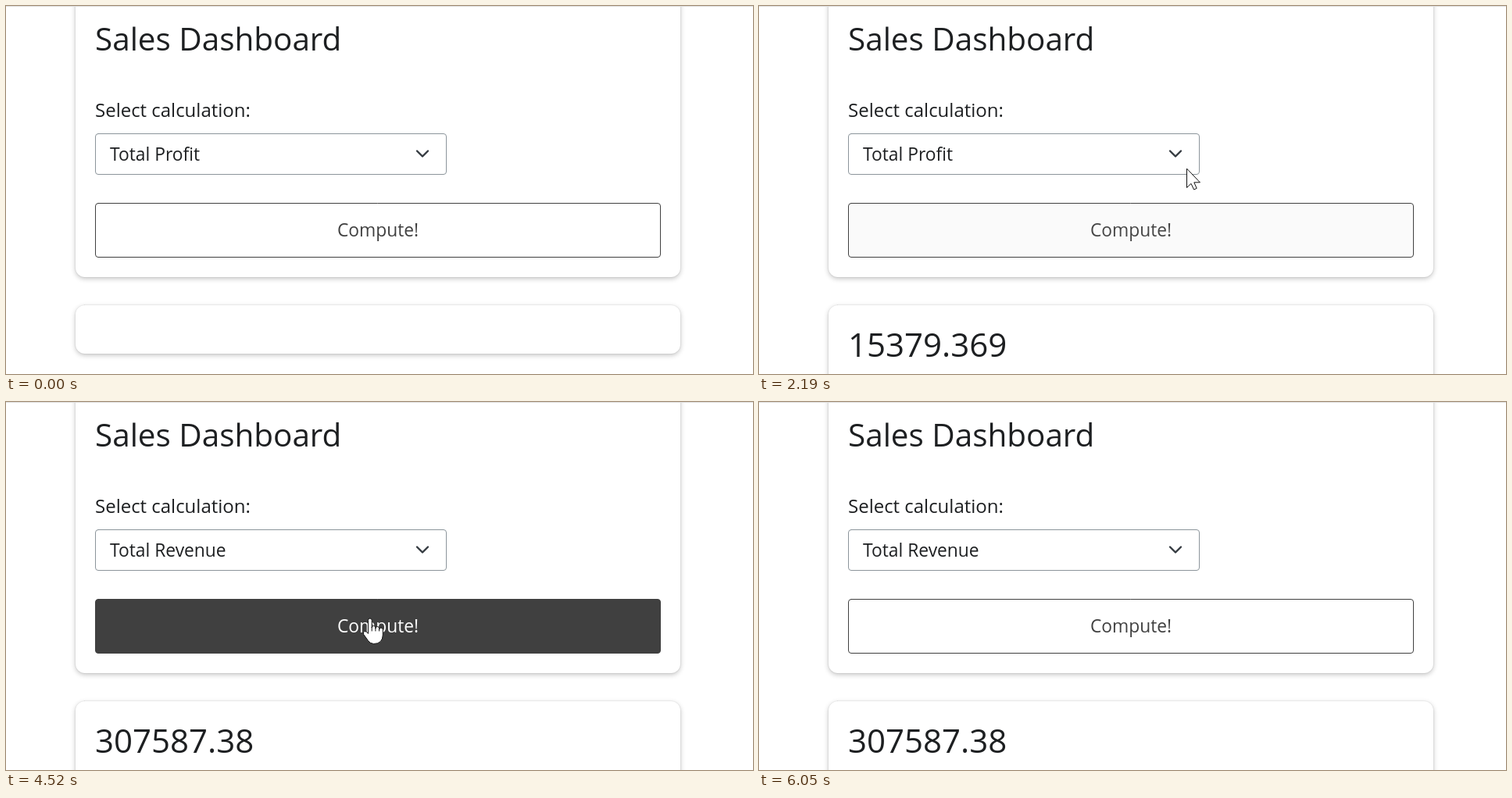
These frames come from a looping animation (956x471 px, 6550 ms). An HTML page with a canvas:

```html
<!DOCTYPE html>
<html lang="en">
<head>
<meta charset="utf-8">
<title>Sales Dashboard</title>
<style>
html, body { margin: 0; width: 100%; height: 100%; overflow: hidden; background: #fff; }
canvas { display: block; }
</style>
</head>
<body>
<canvas id="stage" width="956" height="471"></canvas>
<script>
const ctx = document.getElementById('stage').getContext('2d');
const LOOP = 6550;
const STEP = 67;
const START = 230;
const INK = '#1d1f21';

// Pointer moves: start time, end time, destination.
const origin = { x: 470, y: 332 };
const moves = [
  { from: 230, to: 430, x: 488, y: 309 },
  { from: 630, to: 836, x: 494, y: 237 },
  { from: 836, to: 967, x: 494, y: 268 },
  { from: 1040, to: 1390, x: 510, y: 283 },
  { from: 1970, to: 2173, x: 547, y: 208 },
  { from: 2240, to: 2520, x: 537, y: 185 },
  { from: 2650, to: 3100, x: 441, y: 279 },
  { from: 3600, to: 3710, x: 467, y: 279 },
  { from: 4520, to: 4720, x: 535, y: 174 },
  { from: 4720, to: 4920, x: 614, y: 289 },
  { from: 5060, to: 5390, x: 535, y: 201 },
  { from: 5600, to: 5720, x: 873, y: 468 }
];

const shown = [START, 6050];
const open = [2590, 3380];
const focus = [2600, 3960];
const hovers = [[315, 740], [970, 2055], [3380, 4560], [4895, 5190]];
const clicks = [[1600, 1700], [2520, 2640], [3240, 3380], [3850, 4000]];

const within = (t, [a, b]) => t >= a && t < b;
const clamp = x => Math.min(1, Math.max(0, x));
const smooth = x => x * x * (3 - 2 * x);

// The screen refreshes in even steps.
const stepTime = t => START + Math.floor((t - START + 10) / STEP) * STEP;

function pointerAt(t) {
  let { x, y } = origin;
  for (const move of moves) {
    const k = smooth(clamp((t - move.from) / (move.to - move.from)));
    x += (move.x - x) * k;
    y += (move.y - y) * k;
  }
  return { x: Math.round(x), y: Math.round(y) };
}

// The CSS "ease" timing curve.
function ease(x) {
  let lo = 0, hi = 1;
  for (let i = 0; i < 20; i++) {
    const s = (lo + hi) / 2;
    if (0.75 * s * (1 - s) + s ** 3 < x) lo = s; else hi = s;
  }
  return 0.3 * lo * (1 - lo) ** 2 + 3 * lo * lo * (1 - lo) + lo ** 3;
}

const ramp = t => t <= 0 ? 0 : t >= 150 ? 1 : ease(t / 150);
const fade = (t, [on, off]) => ramp(t - on) - ramp(t - off);

function gray(from, to, k) {
  const v = Math.round(from + (to - from) * k);
  return `rgb(${v},${v},${v})`;
}

function box(x, y, w, h, r, fill, stroke) {
  ctx.beginPath();
  ctx.roundRect(x, y, w, h, r);
  if (fill) { ctx.fillStyle = fill; ctx.fill(); }
  if (stroke) { ctx.strokeStyle = stroke; ctx.lineWidth = 1; ctx.stroke(); }
}

function shadowed(color, blur, dy, draw) {
  ctx.save();
  ctx.shadowColor = color;
  ctx.shadowBlur = blur;
  ctx.shadowOffsetY = dy;
  draw();
  ctx.restore();
}

function text(str, x, y, size, color = INK, align = 'left') {
  ctx.font = `400 ${size}px "Open Sans", sans-serif`;
  ctx.textAlign = align;
  ctx.fillStyle = color;
  ctx.fillText(str, x, y);
}

function card(y, h) {
  shadowed('rgba(0,0,0,.24)', 6, 2, () => box(89, y, 774, h, 12, '#fff'));
  box(88.5, y - 0.5, 775, h + 1, 12, null, 'rgba(0,0,0,.04)');
}

function select(value, ring) {
  if (ring > 0) {
    const grow = 6 * ring;
    box(114 - grow, 163 - grow, 450 + 2 * grow, 53 + 2 * grow, 4 + grow,
      `rgba(0,123,194,${0.25 * ring})`);
  }
  box(114.5, 163.5, 449, 52, 3.5, '#fff', ring > 0.5 ? '#80bde1' : '#8c959b');
  text(value, 133, 198, 22.8);
  ctx.strokeStyle = '#343a40';
  ctx.lineWidth = 2.4;
  ctx.lineCap = ctx.lineJoin = 'round';
  ctx.stroke(new Path2D('M526 185.5L533 192.5L540 185.5'));
}

function button(k) {
  box(114.5, 252.5, 723, 69, 3.5, gray(255, 64, k), '#404040');
  text('Compute!', 476, 295, 22.8, gray(64, 255, k), 'center');
}

function dropdown(active) {
  shadowed('rgba(0,0,0,.4)', 12, 0, () => box(116, 215, 447, 89, 0, '#fff'));
  ctx.fillStyle = '#767676';
  ctx.fillRect(116, 215, 447, 1);
  ctx.fillRect(116, 215, 1, 89);
  ['Total Profit', 'Total Revenue'].forEach((label, i) => {
    const y = 216 + 44 * i;
    if (i === active) box(117, y, 446, 44, 0, '#1967d2');
    text(label, 135, y + 31, 23.2, i === active ? '#fff' : INK);
  });
}

const arrow = new Path2D('M.5 .5V24.5L6 19.3L9.6 27L13.2 25.4L9.8 17.8H17Z');
const hand = new Path2D('M-3.5 17');
const knuckles = new Path2D();
[-2, 7.5, 8.5, 10].forEach((top, i) => {
  const w = 4.7, x = -3.5 + w * i;
  hand.lineTo(x, top + w / 2);
  hand.arc(x + w / 2, top + w / 2, w / 2, Math.PI, 0);
  if (i) {
    knuckles.moveTo(x, top + 2);
    knuckles.lineTo(x, 14);
  }
});
hand.addPath(new Path2D());
hand.lineTo(15.3, 19);
hand.quadraticCurveTo(15, 30.5, 3.5, 30.5);
hand.quadraticCurveTo(-1.5, 30, -3.5, 26.5);
hand.lineTo(-9.3, 18.5);
hand.quadraticCurveTo(-10.5, 15.5, -8.5, 14.6);
hand.quadraticCurveTo(-6, 14, -3.5, 17);

function pointer(x, y, isHand) {
  const shape = isHand ? hand : arrow;
  ctx.save();
  ctx.translate(x, y);
  ctx.fillStyle = '#fff';
  ctx.strokeStyle = '#111';
  ctx.lineWidth = 1;
  ctx.lineJoin = 'round';
  ctx.fill(shape);
  ctx.stroke(shape);
  if (isHand) ctx.stroke(knuckles);
  ctx.restore();
}

function render(time) {
  const t = stepTime(time);
  const { x, y } = pointerAt(t);
  const isOpen = within(time, open);
  const result = time < 1655 ? '' : time < 4055 ? '15379.369' : '307587.38';
  const hover = hovers.reduce((sum, range) => sum + fade(t, range), 0);

  box(0, 0, 956, 471, 0, '#fff');
  card(-30, 377);
  card(383, result ? 116 : 62);
  box(0, 0, 956, 1, 0, '#e0e0e0');

  text('Sales Dashboard', 114, 57, 40.4);
  text('Select calculation:', 114, 142, 24);
  select(time < open[1] ? 'Total Profit' : 'Total Revenue', fade(t, focus));
  button(hover);
  text(result, 114, 449, 42);
  if (isOpen) dropdown(y > 260 ? 1 : 0);

  if (!within(time, shown)) return;
  const onButton = x > 114 && x < 838 && y > 252 && y < 322;
  pointer(x, y, onButton && !isOpen);
  if (clicks.some(range => within(time, range))) {
    box(x - 18, y - 18, 36, 36, 18, 'rgba(255,250,0,.5)');
  }
}

const began = performance.now();
function tick() {
  render((performance.now() - began) % LOOP);
  requestAnimationFrame(tick);
}
tick();
</script>
</body>
</html>
```
